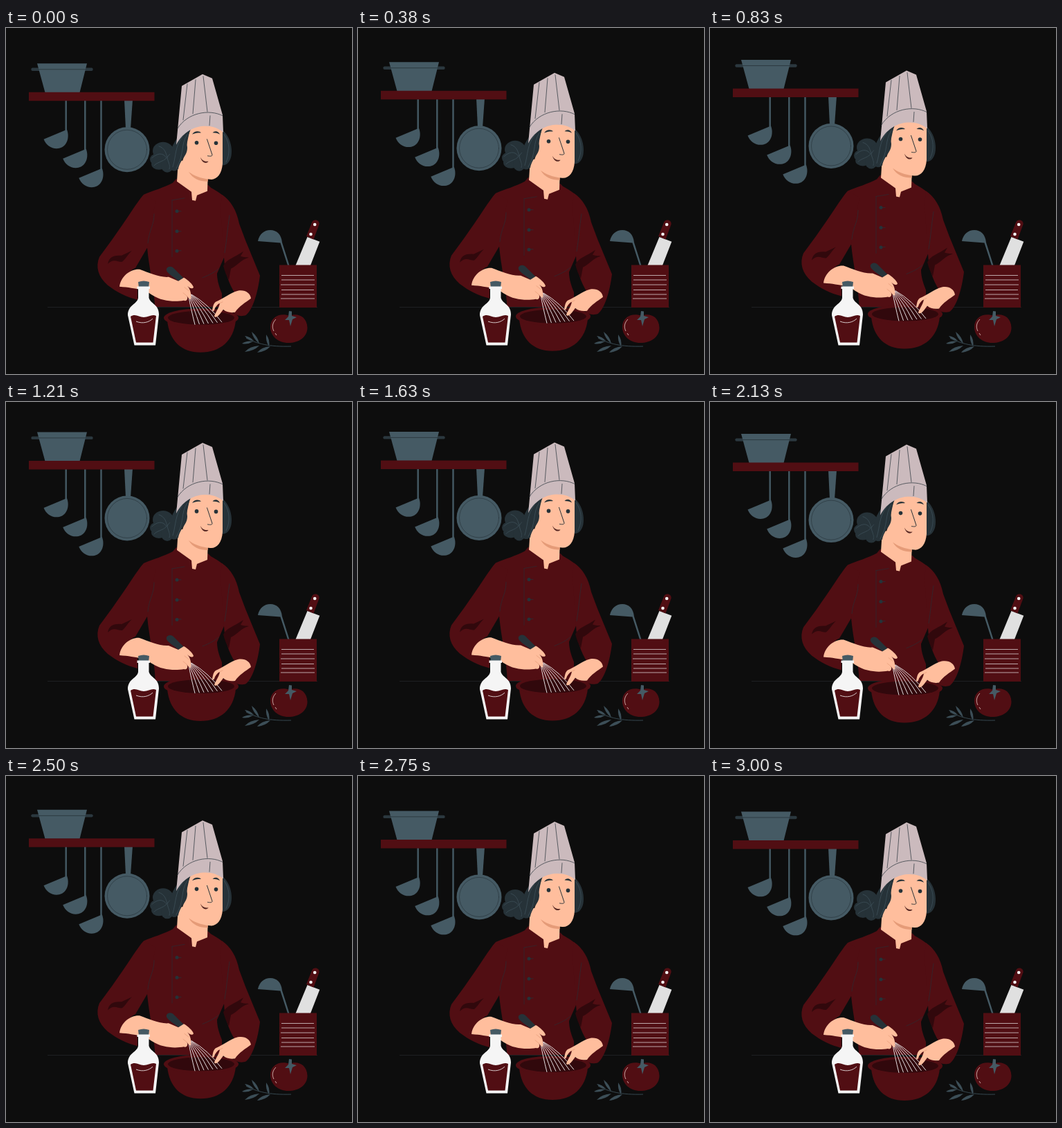
Write an HTML page that moves like this. It is 500 px wide and 500 px high and loops after 3040 ms.

```html
<!DOCTYPE html>
<html lang="en">
<head>
<meta charset="utf-8">
<title>Chef</title>
<style>
html, body { margin: 0; height: 100%; overflow: hidden; background: #0d0d0d; }
svg { display: block; width: 100%; height: 100%; }
.red { fill: #510e13; }
.deep { fill: #31080c; }
.slate { fill: #455a64; }
.dark { fill: #263238; }
.skin { fill: #ffbe9d; }
.white { fill: #f5f5f5; }
.line { fill: none; stroke: #263238; stroke-linecap: round; stroke-linejoin: round; }
</style>
</head>
<body>
<svg viewBox="0 0 500 500">
<defs>
  <clipPath id="above"><path d="M0 0H500V403H0Z"/></clipPath>
  <path id="scoop" class="slate" d="M54.5 161L88 147C92 157 89 171 77 174C67 176 58 170 54.5 161Z"/>
</defs>

<path d="M60 403.5H450" stroke="#232527" stroke-width=".8"/>

<!-- shelf -->
<g class="float">
  <path d="M86.7 104V150M114.3 104V178M137.500 104V206" stroke="#455a64" stroke-width="2.400"/>
  <use href="#scoop"/>
  <use href="#scoop" x="27.7" y="28"/>
  <use href="#scoop" x="50.8" y="56"/>
  <path class="slate" d="M171 104H183L180 146H173Z"/>
  <circle class="slate" cx="175" cy="176" r="32.5"/>
  <circle class="line" cx="175" cy="176" r="28.5" stroke-width=".6"/>
  <path d="M38.500 60H123.500" stroke="#2b383f" stroke-width="4.400" stroke-linecap="round"/>
  <path class="slate" d="M45 51.5H117L106.500 93.500H56.500Z"/>
  <path class="line" d="M47 60H115" stroke-width=".8"/>
  <path class="red" d="M33 93H214.500V105.500H33Z"/>
</g>

<!-- torso and sleeves -->
<g clip-path="url(#above)"><g class="float">
  <path class="red" d="M246 218L241 224C228 231 213 235 199 241L204 318C207 350 215 380 216 415H312V384C308 374 305 365 305 355L315 332L320 248C312 240 303 235 296 231L292 227L274 240Z"/>
</g></g>
<g class="float">
  <path class="red" d="M199 241C190 250 170 285 135 331C129 345 133 360 147 372C160 382 174 389 190 393V372C167 366 178 350 187 347L204 318L216 250Z"/>
  <path class="red" d="M312 241C325 250 333 263 337 283L346 307L367 358C364 382 357 407 347 415C340 418 332 416 328 411L331 384C322 370 316 352 315 332L310 260Z"/>
  <path class="deep" d="M147 341C149 332 154 328 167 329L182 322C176 327 174 333 168 338C162 339 156 332 147 341Z"/>
  <path class="deep" d="M314 344C319 334 330 332 343 323L339 330C344 332 348 331 351 332C340 334 333 345 325 348L322 364C318 358 316 351 314 344Z"/>

  <!-- jacket seams -->
  <g class="line" stroke-width=".8">
    <path d="M240 249V331M240 249L258 246M214 269C214 286 207 291 205 311M323 271C320 290 319 308 316 325M307 348C302 353 294 357 284 361" opacity=".75"/>
    <path d="M247 265H253M247 294H253M247 322H253"/>
  </g>
  <g class="dark">
    <circle cx="247" cy="265" r="2.500"/><circle cx="247" cy="294" r="2.500"/><circle cx="247" cy="322.500" r="2.500"/>
  </g>

  <!-- hair -->
  <g class="dark">
    <ellipse cx="227" cy="178" rx="15" ry="13"/>
    <ellipse cx="217" cy="190" rx="9" ry="8"/>
    <ellipse cx="221" cy="197" rx="11" ry="8"/>
    <ellipse cx="233" cy="199" rx="9" ry="10"/>
    <ellipse cx="242" cy="187" rx="11" ry="14"/>
    <path d="M247 163C262 138 295 136 313 148C327 159 330 186 321 195C318 199 312 199 308 199L266 170Z"/>
  </g>
  <path class="line" d="M211 188C222 178 229 183 232 188C226 194 218 194 214 199M221 171C230 174 231 181 233 187C234 194 238 198 236 204M233 187C239 178 246 176 250 181M315 154C324 166 324 182 318 194" style="stroke:#455a64" stroke-width=".6"/>

  <!-- neck and face -->
  <path class="skin" d="M249 190L247 222L268 237L269 249L274 250L276 242L291 236L292 205Z"/>
  <path d="M264 208C272 212 283 215 291.700 216V222C279 222 270 218 264 208Z" fill="#e59b78"/>
  <path class="skin" d="M266 147C280 138 303 138 313 148V196C312 212 304 220 295 219C282 218 270 213 264 208L249 204C259 190 260 170 266 147Z"/>
  <path class="dark" d="M247 160C252 150 258 146 268 143C265 153 260 160 262 173C262 186 252 189 249 204C243 210 235 205 237 199C234 188 238 172 247 160Z"/>
  <path class="line" d="M262 154C252 168 258 184 246 203M255 157C244 172 246 184 241 201" style="stroke:#455a64" stroke-width=".6"/>
  <path class="dark" d="M269 154C272 148.500 279 148.500 282 151.500C278 152 274 151.500 269 154ZM298.500 151.500C302 148 307 149 309 154C306 151.800 302 151.800 298.500 151.500Z"/>
  <circle class="dark" cx="275.500" cy="166" r="2.800"/>
  <circle class="dark" cx="303.500" cy="166.500" r="2.800"/>
  <path class="line" d="M290.500 161L298 183.500C298 186 294 185.500 291.500 185" stroke-width="1"/>
  <path d="M281 187C283 191 286 193.500 292.500 193C290 197 283 195.500 281 187Z" fill="#592a25"/>

  <!-- hat -->
  <path d="M246 169L254 84L284 67L298 73L313 126L314 151C298 137 263 137 246 169Z" fill="#cbbabd"/>
  <path class="line" d="M247.500 146C262 122 294 117 313 127M262 81L256 133M274 75L270 124M285 70L291 121M295 127L294 141" stroke-width=".7"/>

  <!-- bowl and whisk -->
  <path class="red" d="M233 423C236 452 253 469 281 469C310 469 329 452 332 423Z"/>
  <ellipse class="red" cx="282" cy="419" rx="54" ry="13.500"/>
  <ellipse class="deep" cx="282" cy="419" rx="48" ry="10"/>
  <path id="wires" fill="none" stroke="#f5f5f5" stroke-width=".9"/>
  <path class="dark" d="M232 348C234 344 240 344 243 348L257 362L252 368C243 360 230 354 232 348Z"/>

  <!-- forearms -->
  <path class="skin" d="M164 374C166 358 181 348 193 349C207 354 222 361 235 360L249 366L257 361C263 364 270 371 271 375C269 378 265 376 262 373C267 378 268 386 267 392C264 392 263 389 261 387C264 391 261 396 257 394C245 396 226 396 211 386C203 380 190 376 164 374Z"/>
  <path class="skin" d="M354 391C353 383 345 378 335 380C324 383 315 391 303 396C299 399 299 405 298 408C299 411 301 409 302 405C304 402 306 399 309 398C308 405 302 412 301 417C304 420 308 415 311 411L314 407C318 411 325 412 331 411C337 402 346 397 354 391Z"/>
  <path d="M261 387L256 383M264 380L258 375M309 398L313 396" class="line" style="stroke:#e59b78" stroke-width=".7"/>
</g>

<!-- bottle -->
<path class="slate" d="M191 367Q199 364 207 367L206 376H192Z"/>
<path class="white" d="M189.500 373.500H208V377H206.500V390C209 399 221 399 221 414L216 458.500H185.500L176 415C176 400 190 399 191 390V377H189.500Z"/>
<path class="red" d="M180 417C187 412 192 418 199 418C206 418 211 413 217 416L212.500 454.500H188Z"/>
<path d="M188 424C198 428 207 425 212 420" fill="none" stroke="#f5f5f5" stroke-width=".8"/>

<!-- utensil box -->
<path class="slate" d="M364 308C366 298 373 292 382 292C391 292 398 298 399 310L409.500 343H407L396.500 310.500Z"/>
<path d="M435.500 302L453.300 308.800L440 343H418.500Z" fill="#e0e0e0"/>
<path class="red" d="M434 301L442 281C444 275 454 277 452.500 284L444.500 305.500Z"/>
<circle class="white" cx="446.200" cy="284" r="2.300"/>
<circle class="white" cx="440.500" cy="298" r="2.300"/>
<path class="red" d="M395 342.500H449V404H395Z"/>
<path d="M398 357.500H445M398 364H446M397 371H446M398 378.500H445M398 385H446M397 391H446" stroke="#d9cfd0" stroke-width=".8"/>

<!-- tomato and sprig -->
<path class="red" d="M410 416C420 411 435 416 435.500 433C435.500 447 423 455 408 455C393 455 382 445 382 432C382 416 398 411 410 416Z"/>
<path d="M390 421C385 426 384 432 387 438M389 441L391 444" fill="none" stroke="#e9c9c4" stroke-width=".8"/>
<path class="slate" d="M409 409L413 409.500L413 416L420 418L414 421L411 431L409 422L403 422L408 417Z"/>
<path d="M347 448C362 456 380 461 412 460" fill="none" stroke="#3c4e57" stroke-width=".9"/>
<path fill="#3c4e57" d="M355 439Q364 446 366 456Q357 449 355 439ZM376 443Q382 451 380 460Q375 453 376 443ZM345 445Q353 446 358 452Q349 451 345 445ZM341 456Q348 451 357 453Q349 458 341 456ZM345 468Q352 460 366 459Q358 467 345 468ZM363 469Q369 461 382 460Q375 468 363 469Z"/>
</svg>
<script>
const LOOP = 3040, RISE = 9.3, LEAD = 50;
const floats = document.querySelectorAll('.float');

// Wires fan out from the handle into the bowl.
let fan = '';
for (let i = 0; i < 7; i++) {
  fan += `M${264 + i * .6} ${388 - i * .5}Q${267 + i * 4.2} ${405 - i} ${273 + i * 6.5} ${429 - i * .6}`;
}
document.getElementById('wires').setAttribute('d', fan);

function lift(time) {
  const phase = ((time + LEAD) % LOOP) / LOOP;
  const ramp = 1 - Math.abs(1 - 2 * phase);
  const wave = (1 - Math.cos(2 * Math.PI * phase)) / 2;
  return RISE * (.6 * ramp + .4 * wave);
}

const start = performance.now();
function draw() {
  const y = -lift(performance.now() - start);
  for (const part of floats) part.setAttribute('transform', `translate(0 ${y.toFixed(2)})`);
  requestAnimationFrame(draw);
}
draw();
</script>
</body>
</html>
```
